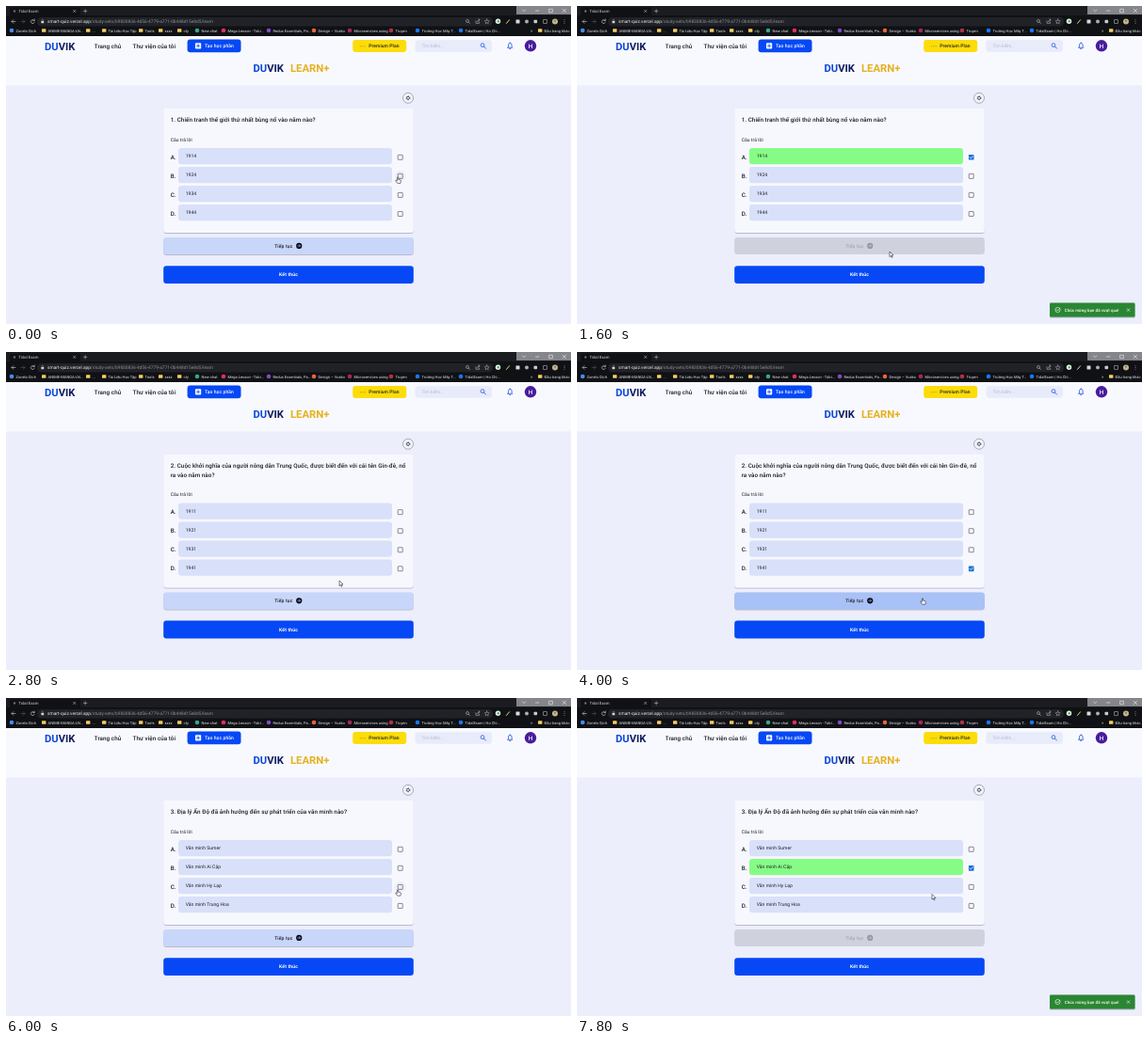
Write an HTML page that moves like this. It is 600 px wide and 338 px high and loops after 8 s.

```html
<!DOCTYPE html>
<html lang="vi">
<head>
<meta charset="utf-8">
<title>Tidal Exam</title>
<style>
  html, body { margin: 0; width: 100%; height: 100%; overflow: hidden; background: #eceefb; }
  svg { display: block; width: 100%; height: 100%; }
  text { font-family: Roboto, Arial, sans-serif; text-rendering: geometricPrecision; white-space: pre; }
  #header .nav, #quiz text { letter-spacing: .0094em; }
  #quiz .button { letter-spacing: .028em; }
</style>
</head>
<body>
<svg id="stage" viewBox="0 0 600 338">
  <defs>
    <filter id="soft" x="-5%" y="-20%" width="110%" height="150%">
      <feDropShadow dx="0" dy=".75" stdDeviation=".45" flood-color="#30385c" flood-opacity=".38"/>
    </filter>
  </defs>
  <g id="chrome"></g>
  <g id="header"></g>
  <g id="quiz"></g>
  <g id="toast"></g>
  <g id="cursor"></g>
</svg>
<script>
const LOOP = 8000, STEP = 200;
const INK = '#1c1d25', BLUE = '#0648f5';
const put = (id, markup) => { document.getElementById(id).innerHTML = markup; };

const rect = (x, y, w, h, fill, r = 0, more = '') =>
  `<rect x="${x}" y="${y}" width="${w}" height="${h}" rx="${r}" fill="${fill}" ${more}/>`;
const dot = (x, y, r, fill, more = '') => `<circle cx="${x}" cy="${y}" r="${r}" fill="${fill}" ${more}/>`;
const text = (x, y, size, str, fill = INK, weight = 400, more = '') =>
  `<text x="${x}" y="${y}" font-size="${size}" font-weight="${weight}" fill="${fill}" ${more}>${str}</text>`;
const line = (d, color, width = .7, more = '') =>
  `<path d="${d}" fill="none" stroke="${color}" stroke-width="${width}" stroke-linecap="round" stroke-linejoin="round" ${more}/>`;

// Browser frame

const FOLDER = '#f3cb62';
const bookmarks = [
  [5, 'Zunelo Dịch', '#4a8af4'], [39, 'ANIME-MANGA-LN...', FOLDER], [86, '...', FOLDER],
  [103, 'Tài Liệu Học Tập', FOLDER], [142, 'Tools', FOLDER], [163, 'xxxx', FOLDER],
  [183, 'cty', FOLDER], [202, 'New chat', '#3aa58b'], [230, 'Mega Lesson - Tobi...', '#e0305a'],
  [278, 'Redux Essentials, Pa...', '#7a4fc0'], [326, 'Design – Vusko', '#e8643c'],
  [364, 'Microservices using...', '#a8285c'], [408, 'Truyen', '#b03048'],
  [436, 'Trường Học Mây T...', '#1877f2'], [482, 'TidalExam | Ho Chi...', '#1877f2'],
  [566, 'Đầu trang khác', FOLDER]
];

function drawChrome() {
  const pale = '#d4d6dc', dim = '#8d9098';
  let s = rect(0, 0, 600, 33, '#101114') + rect(0, 0, 600, 10, '#1b1c20');
  s += rect(4, 1.5, 75, 10, '#101114', 2) + dot(9, 5.5, 1.2, '#6a6e78');
  s += text(13.3, 6.8, 4.3, 'Tidal Exam', pale);
  s += line('M71.5 4.2l2.4 2.4m0-2.4l-2.4 2.4M82.5 5.4h3.4m-1.7-1.7v3.4', pale, .5);
  s += rect(542, 0, 58, 9, '#85868b');
  s += line('M548.5 4l1.7 1.6 1.7-1.6M562.5 5h3.4M577 3.3h3.4v3.4h-3.4zM591.2 3.2l3.4 3.4m0-3.4l-3.4 3.4', '#f0f0f3', .6);
  s += rect(33, 12, 484, 9.5, '#202227', 4.5);
  s += line('M10 16.5H6m1.8-1.8L6 16.5l1.8 1.8', pale, .6);
  s += line('M16 16.5h4m-1.8-1.8l1.8 1.8-1.8 1.8', '#565961', .6);
  s += line('M30 15.4a2 2 0 1 0 .2 2M30.3 14v1.6h-1.6', pale, .6);
  s += rect(37.4, 16, 2.8, 2.3, pale, .4) + line('M38 16v-.7a.8.8 0 0 1 1.6 0v.7', pale, .4);
  s += text(44, 18.2, 4.8, `smart-quiz.vercel.app<tspan fill="${dim}">/study-sets/b9830836-4d56-4779-a771-0b448d15e8d5/learn</tspan>`, '#eceef2');
  s += dot(490, 16, 1.5, 'none', `stroke="${pale}" stroke-width=".5"`) + line('M491.2 17.2l1.3 1.3', pale, .5);
  s += line('M499 15.8v2.5h3.6v-1.2M500.5 16.8q.3-2 2.4-2.1m-1-1l1.1 1-1.1 1', pale, .5);
  s += line('M510.7 14l.7 1.6 1.8.2-1.4 1.2.4 1.8-1.5-.9-1.5.9.4-1.8-1.4-1.2 1.8-.2z', pale, .4);
  s += dot(522.5, 16.3, 2.7, '#eef2ee') + dot(522.8, 16.3, 1.3, '#46b45a') + line('M531.5 18.4l3-3.6', '#f0d98c', 1);
  s += rect(541.5, 14.5, 4, 4, '#d6d9df', .5) + dot(553, 16.5, 2, '#aaaeb8');
  s += rect(560.5, 14.7, 3.6, 3.6, '#c7cad1', .8) + rect(570.5, 14.5, 4, 4, 'none', .4, `stroke="${pale}" stroke-width=".5"`);
  s += dot(583, 16.5, 3, '#c5b389') + dot(583, 15.8, 1, '#6e7c64');
  s += [14.8, 16.5, 18.2].map(y => dot(593, y, .45, pale)).join('');
  for (const [x, name, color] of bookmarks) {
    s += color === FOLDER ? rect(x - 1, 24.3, 4.4, 3.5, color, .5) : dot(x + 1, 26, 2.3, color);
    s += text(x + 5.6, 27.6, 4.05, name, '#e2e4e9');
  }
  s += text(557, 27.6, 5, '»', pale);
  put('chrome', s);
}

// Site header

const brand = (x, y) => text(x, y, 11.2, `DU<tspan fill="#111d5e">VIK</tspan>`, '#0b47dc', 700);

function drawHeader() {
  let s = rect(0, 32, 600, 306, '#eceefb') + rect(0, 32, 600, 52.5, '#f8f9fe');
  s += brand(41, 46.6) + brand(262.5, 69.8);
  s += text(302, 69.8, 11.3, 'LEARN+', '#e6b01f', 700);
  s += text(93.8, 44.8, 6.25, 'Trang chủ', INK, 500, 'class="nav"');
  s += text(134.6, 44.8, 6.25, 'Thư viện của tôi', INK, 500, 'class="nav"');
  s += rect(192.6, 35.5, 56.9, 13.75, BLUE, 3);
  s += rect(201, 39.2, 6.2, 6.2, '#fff', .9) + line('M204.1 40.6v3.4m-1.7-1.7h3.4', BLUE, .8);
  s += text(211, 44.2, 5, 'Tạo học phần', '#fff', 500, 'letter-spacing=".08"');
  s += rect(368.2, 36, 57, 13, '#fcdd0a', 3);
  s += [376.4, 378.8, 381.2].map(x => dot(x, 42.7, .75, '#dda315')).join('');
  s += text(385.3, 44.2, 5, 'Premium Plan', '#202020', 500, 'letter-spacing=".05"');
  s += rect(434.5, 36.2, 81.5, 12.6, '#e8ebfa', 3) + text(441.5, 44, 4.8, 'Tìm kiếm...', '#b4b9cf');
  s += dot(506, 41.6, 1.9, 'none', 'stroke="#2458dc" stroke-width=".8"') + line('M507.5 43.1l2 2', '#2458dc', .9);
  s += line('M532.8 44.3h5l-.7-1v-2a1.8 1.8 0 0 0-3.6 0v2zM534.7 45.6h1.2M535.3 39.4v-.6', '#2156dd', .8);
  s += dot(557, 42.3, 6.2, '#4a1b9e') + text(557, 44.6, 6.3, 'H', '#fff', 500, 'text-anchor="middle"');
  s += dot(427, 97.8, 5.5, '#f3f4fc', 'stroke="#777b8c" stroke-width=".6"');
  s += dot(427, 97.8, 1.5, 'none', 'stroke="#444855" stroke-width=".9"');
  s += dot(427, 97.8, 2.1, 'none', 'stroke="#444855" stroke-width=".6" stroke-dasharray="1 1.2"');
  put('header', s);
}

// Quiz

const rounds = [
  { from: 0, tick: 400, send: 1200, result: 1400, pick: 0, right: 0, slide: 46,
    title: ['1. Chiến tranh thế giới thứ nhất bùng nổ vào năm nào?'],
    options: ['1914', '1924', '1934', '1944'] },
  { from: 2800, tick: 3400, send: 4200, result: 4400, pick: 3, right: 2, slide: 46,
    title: ['2. Cuộc khởi nghĩa của người nông dân Trung Quốc, được biết đến với cái tên Gin-đê, nổ', 'ra vào năm nào?'],
    options: ['1911', '1921', '1931', '1941'] },
  { from: 5800, tick: 6400, send: 6800, result: 7000, pick: 1, right: 1, slide: 0,
    title: ['3. Địa lý Ấn Độ đã ảnh hưởng đến sự phát triển của văn minh nào?'],
    options: ['Văn minh Sumer', 'Văn minh Ai Cập', 'Văn minh Hy Lạp', 'Văn minh Trung Hoa'] }
];

const LEFT = 167.2, WIDTH = 265.6, LINE = 9.375, BOX_X = 418.7;
const shiftOf = q => (q.title.length - 1) * LINE;
const boxY = (q, i) => 160.8 + i * 20.05 + shiftOf(q);
const overBox = (q, i, p) => Math.hypot(p.x - BOX_X, p.y - boxY(q, i)) < 6;
const overNext = (q, p) => p.x > 167 && p.x < 433 && p.y > 246 + shiftOf(q) && p.y < 264 + shiftOf(q);

function checkbox(x, y, on) {
  if (!on) return rect(x - 2.5, y - 2.5, 5, 5, 'none', .4, 'stroke="#4c4e58" stroke-width=".65"');
  return rect(x - 2.8, y - 2.8, 5.6, 5.6, '#1b6fd8', .6) + line(`M${x - 1.7} ${y}l1.2 1.3 2.4-2.6`, '#fff', .7);
}

function optionColor(q, i, t) {
  if (t < q.result) return '#d9e0f9';
  return i === q.right ? '#86fc86' : i === q.pick ? '#f68991' : '#d9e0f9';
}

function drawQuiz(q, t, p) {
  const dy = shiftOf(q), sent = t >= q.send;
  let s = rect(LEFT, 108.7, WIDTH, 132.3 + dy, '#f7f8fe', 3.2, 'filter="url(#soft)"');
  q.title.forEach((str, i) => { s += text(174.7, 123.2 + i * LINE, 6.25, str, INK, 500); });
  s += text(174.7, 143.6 + dy, 5, 'Câu trả lời');
  q.options.forEach((str, i) => {
    const y = 151 + i * 20 + dy;
    s += text(174.7, y + 12, 6.25, 'ABCD'[i] + '.', INK, 500);
    s += rect(183, y, 227, 17.3, optionColor(q, i, t), 3.2) + text(190.7, y + 10.3, 5, str);
    if (overBox(q, i, p)) s += dot(BOX_X, boxY(q, i), 6, '#eef0f8');
    s += checkbox(BOX_X, boxY(q, i), i === q.pick && t >= q.tick);
  });

  const fill = t >= q.result ? '#cfd1dd' : sent ? '#84a6eb' : overNext(q, p) ? '#a8c1f6' : '#c8d6f9';
  const ink = t >= q.result ? '#a3a5b0' : sent ? '#6078a8' : INK;
  const icon = sent ? (t >= q.result ? '#9698a2' : '#566b98') : '#090b1c';
  s += rect(LEFT, 246 + dy, WIDTH, 18, fill, 3.2, t < q.result ? 'filter="url(#soft)"' : '');
  s += text(285.2, 256.6 + dy, 5, 'Tiếp tục', ink, 500, 'class="button"');
  s += dot(311.2, 254.9 + dy, 3.1, icon);
  s += line(`M309.8 ${254.9 + dy}h2.7m-1.2-1.2l1.2 1.2-1.2 1.2`, fill, .6);
  s += rect(LEFT, 276.2 + dy, WIDTH, 18.8, BLUE, 3.2);
  s += text(300, 287.4 + dy, 5, 'Kết thúc', '#fff', 700, 'class="button" text-anchor="middle"');
  put('quiz', s);
}

function drawToast(q, t) {
  if (t < q.result) return put('toast', '');
  const good = q.pick === q.right, x = good ? 502 : 504;
  const dx = t < q.result + STEP ? q.slide : 0;
  let s = rect(x, 315.5, 592.5 - x, 15, good ? '#2a8631' : '#cf1a30', 1.3, 'filter="url(#soft)"');
  s += dot(x + 8.5, 323, 2.6, 'none', 'stroke="#fff" stroke-width=".6"');
  s += good ? line(`M${x + 7.3} 322.9l1 1.1 2.6-2.8`, '#fff', .6) : line(`M${x + 8.5} 321.6v1.5m0 1.2v.1`, '#fff', .6);
  s += text(x + 15.8, 324.6, 4.4, good ? 'Chúc mừng bạn đã vượt qua!' : 'Bạn đã lựa chọn đáp án sai!', '#fff', 500, 'letter-spacing=".04"');
  s += line('M584.2 321.8l2.6 2.6m0-2.6l-2.6 2.6', '#fff', .6);
  put('toast', `<g transform="translate(${dx})">${s}</g>`);
}

// Pointer: time, x, y
const path = [
  [0, 416, 181.7], [200, 418, 165], [400, 418, 161], [600, 400, 188], [800, 345, 248],
  [1000, 328, 258], [1200, 326, 266.5], [1600, 332, 261], [2400, 347.5, 244], [2800, 354, 243],
  [3200, 416, 226], [3400, 418, 229], [3800, 376, 259], [4000, 367, 261.5], [4400, 369, 261],
  [4800, 388, 250], [5200, 407, 237], [5800, 414, 214], [6000, 416, 203.5], [6400, 418, 180],
  [6600, 392, 225], [6800, 371, 253], [7000, 370, 253], [7800, 377, 208.5], [8000, 377, 208.5]
];

function pointerAt(t) {
  const i = path.findIndex(k => k[0] > t);
  const [t0, x0, y0] = path[i - 1], [t1, x1, y1] = path[i];
  const u = (t - t0) / (t1 - t0);
  return { x: x0 + (x1 - x0) * u, y: y0 + (y1 - y0) * u };
}

const ARROW = 'M0 0v5.6l1.3-1.2.9 2 .9-.4-.9-2h1.8z';
const HAND = 'M-.6.5q.6-.9 1.2 0v2.2l2.3.6q.6.2.5.9l-.5 2.5h-3.2l-2-2.6q0-.9.8-.6l.9.7z';

function drawPointer(q, t, p) {
  const hand = q.options.some((_, i) => overBox(q, i, p)) || (t < q.send && overNext(q, p));
  put('cursor', `<path d="${hand ? HAND : ARROW}" transform="translate(${p.x} ${p.y})" fill="#fff" stroke="#15161c" stroke-width=".55" stroke-linejoin="round"/>`);
}

function render(time) {
  const t = Math.floor((time % LOOP) / STEP) * STEP;
  const q = rounds.filter(r => r.from <= t).pop();
  const p = pointerAt(t);
  drawQuiz(q, t, p);
  drawToast(q, t);
  drawPointer(q, t, p);
}

drawChrome();
drawHeader();
const start = performance.now();
function tick() {
  render(performance.now() - start);
  requestAnimationFrame(tick);
}
tick();
</script>
</body>
</html>
```
